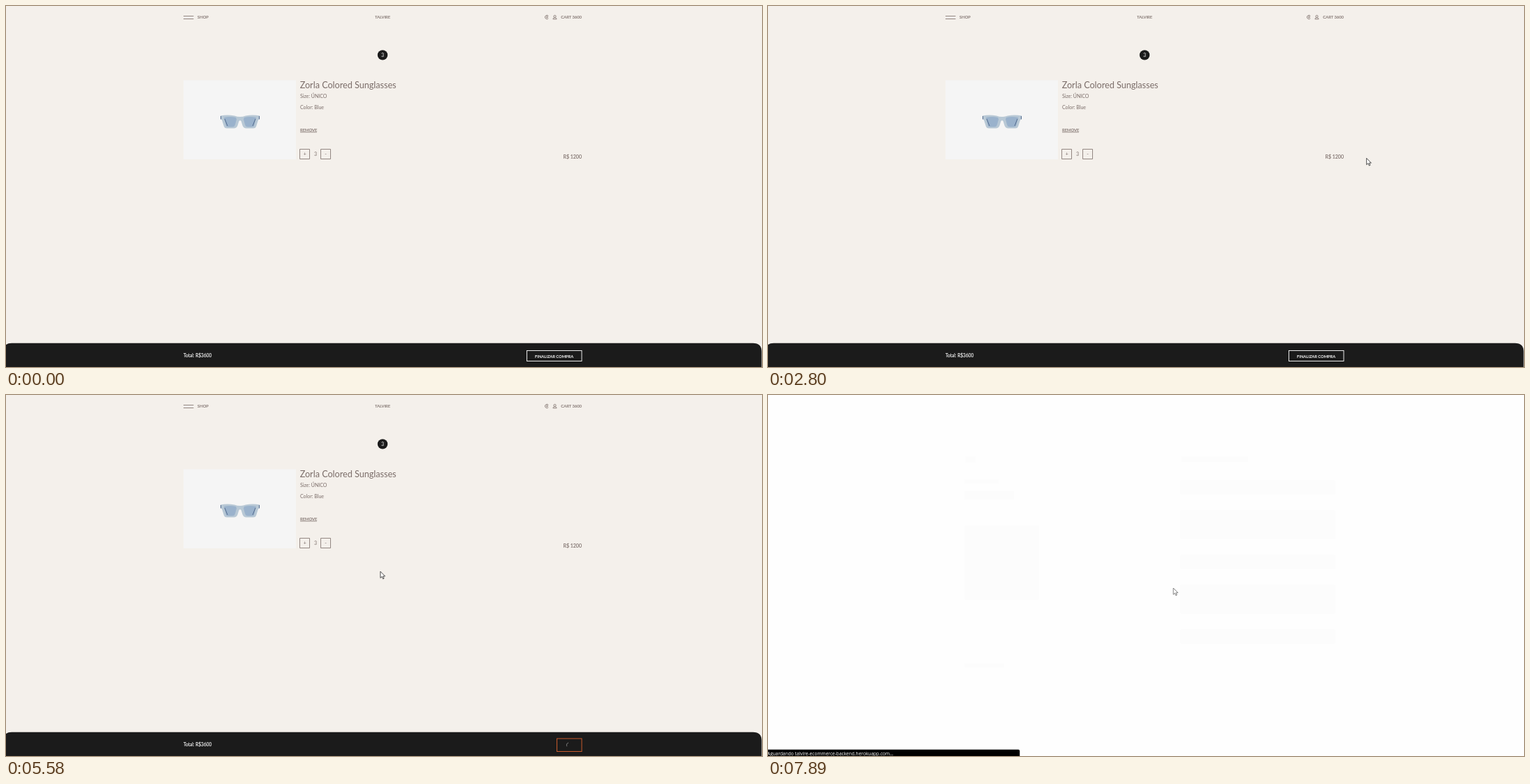
Write an HTML page that moves like this. It is 1082 by 518 pixels and loops after 8 s.

```html
<!DOCTYPE html>
<html lang="pt">
<head>
<meta charset="utf-8">
<title>Cart</title>
<style>
html, body { margin: 0; width: 100%; height: 100%; overflow: hidden; background: #f4f0eb; }
svg { display: block; width: 100vw; height: 100vh; }
text { font-family: Lato, sans-serif; fill: #7a6c68; }
.nav { font-size: 5.85px; }
.med { stroke: #7a6c68; stroke-width: .12px; }
.info { font-size: 7px; }
.line { fill: none; stroke: #7a6c68; stroke-width: .8px; }
.light { fill: #fff; }
.mid { text-anchor: middle; }
.end { text-anchor: end; }
#status text { font: 6.6px 'Open Sans', sans-serif; }
</style>
</head>
<body>
<svg viewBox="0 0 1082 518" preserveAspectRatio="none">
  <g id="cart">
    <rect width="1082" height="518" fill="#f4f0eb"/>
    <path class="line" d="M254 14.5h14.5M254 18.5h14.5"/>
    <text class="nav med" x="274" y="18.3">SHOP</text>
    <text class="nav med mid" x="539" y="18.3">TALVIRE</text>
    <g class="line">
      <path d="M776.2 14.2A2.7 2.7 0 1 0 776.2 17.8M773 15h3M773 16.6h2.6"/>
      <circle cx="785.5" cy="14.9" r="1.6"/>
      <path d="M782.9 18.8c0-2.8 5.2-2.8 5.2 0z"/>
    </g>
    <text class="nav med end" x="824" y="18.3">CART 3600</text>

    <circle cx="539" cy="70.4" r="7.2" fill="#1b1b1b"/>
    <text class="info light mid" x="539" y="73">3</text>

    <rect x="254" y="106.5" width="161" height="113.5" fill="#f5f5f5"/>
    <g transform="translate(335 156)">
      <g id="half">
        <path d="M.2 3Q-4 3-8 1.5-18-.3-28 1.5V6l2 1.500 3 9.500Q-22 19.500-19 19.500H-9Q-5 19.500-3.500 15.500L-1.700 9.500Q-1 8 .2 8z" fill="#b8c8d5"/>
        <path d="M-23 4Q-14 2-6 4L-5 6.500-7 14Q-8 17.500-11 17.500H-17Q-20 17.500-20.500 14.500z" fill="#9ab2cc"/>
        <path d="M-27.500 2V6.500M-22 6l4 10" fill="none" stroke="#526a8c"/>
      </g>
      <use href="#half" transform="scale(-1 1)"/>
    </g>

    <text x="420.7" y="117.5" font-size="12.6">Zorla Colored Sunglasses</text>
    <text class="info" x="421" y="132">Size: ÚNICO</text>
    <text class="info" x="421" y="148">Color: Blue</text>
    <text class="nav med" x="421" y="180">REMOVE</text>
    <path class="line" d="M421 181h24"/>
    <path class="line" d="M420.500 205.500h14v14h-14zM450.500 205.500h14v14h-14z"/>
    <text class="info mid" x="427.700" y="215">+</text>
    <text class="info mid" x="443" y="215">3</text>
    <text class="info mid" x="457.500" y="215">-</text>
    <text class="info med end" x="824" y="219.200">R$ 1200</text>

    <path d="M-4 518V496Q-4 483.700 8 483.700H1069Q1081.500 483.700 1081.500 496V518z" fill="#1b1b1b"/>
    <text class="light" x="254" y="504.400" font-size="6.550" stroke="#fff" stroke-width=".12">Total: R$3600</text>
    <g id="buy">
      <rect x="745.500" y="494.500" width="78.500" height="15" fill="none" stroke="#fff" stroke-width=".9"/>
      <text class="light mid" x="784.600" y="504.500" font-size="5.700" font-weight="700">FINALIZAR COMPRA</text>
    </g>
    <g id="busy">
      <rect x="788.500" y="493" width="35.500" height="18.500" fill="none" stroke="#c75a2c"/>
      <path id="spin" d="M0-4A4 4 0 0 1 4 0" fill="none" stroke="#8b8b8b" stroke-width=".8"/>
    </g>
  </g>

  <g id="blank">
    <rect width="1082" height="518" fill="#fefefe"/>
    <g id="left" fill="#fcfcfc">
      <rect x="283" y="88" width="14" height="9"/>
      <rect x="281" y="121" width="49" height="6"/>
      <rect x="281" y="138" width="71" height="12"/>
      <rect x="281" y="187" width="107" height="107" rx="2"/>
      <rect x="281" y="385" width="57" height="6"/>
    </g>
    <g id="right" fill="#fcfcfc">
      <rect x="592" y="88" width="95" height="8"/>
    </g>
  </g>

  <g id="status">
    <path d="M0 508.700H358q2.300 0 2.300 2V518H0z"/>
    <text class="light" x="-1" y="517.300">Aguardando talvire-ecommerce-backend.herokuapp.com...</text>
  </g>

  <g id="pointer" stroke="#222" stroke-width=".8" fill="#fff">
    <path id="arrow" d="M.5.500V9.800L2.700 7.800 4.200 11.200 5.700 10.500 4.300 7.300H7.200z"/>
    <path id="hand" d="M-1 1Q0-.500 1 1V5L5 6Q6 6.300 5.700 8L4.800 11V13H-1V11.500L-3.800 8Q-4 6.500-2.500 7L-1 8.200z"/>
  </g>
</svg>
<script>
const LOOP = 8000, STEP = 68.75, START = 190;
const $ = id => document.getElementById(id);
const ramp = (t, a, b) => Math.max(0, Math.min(1, (t - a) / (b - a)));
const ease = u => u * u * (3 - 2 * u);
const show = (id, on) => $(id).setAttribute('display', on ? 'inline' : 'none');
const move = (id, x, y, extra = '') => $(id).setAttribute('transform', `translate(${x} ${y})${extra}`);

// where the pointer goes next, and when it sets off and arrives
const moves = [
  { from: START, to: 900, x: 341, y: 146 },
  { from: 940, to: 1340, x: 548, y: 104 },
  { from: 1400, to: 1890, x: 414, y: 124 },
  { from: 1920, to: 2560, x: 869, y: 212 },
  { from: 2670, to: 3420, x: 241, y: 500 },
  { from: 3500, to: 3760, x: 305, y: 496.5 },
  { from: 3790, to: 4240, x: 792, y: 504 },
  { from: 4900, to: 5180, x: 479, y: 222 },
  { from: 5200, to: 5850, x: 579, y: 276.5 }
];

function pointerAt(t) {
  let x = 1012, y = 514;
  for (const m of moves) {
    const k = ease(ramp(t, m.from, m.to));
    x += (m.x - x) * k;
    y += (m.y - y) * k;
  }
  return [x, y];
}

// form placeholders, single and double rows by turns
for (let i = 0, y = 122; i < 5; i++) {
  const h = i % 2 ? 42 : 21;
  $('right').innerHTML += `<rect x="590" y="${y}" width="222" height="${h}" rx="2"/>`;
  y += h + 22;
}

function draw(now) {
  const time = now % LOOP;
  const t = START + Math.floor((time - START) / STEP) * STEP;
  const blank = time >= 6805;
  const busy = t >= 4520 && t < 6030;
  show('cart', !blank);
  show('blank', blank);
  show('buy', !busy);
  show('busy', busy);
  show('status', time >= 6180);
  move('spin', 806.5, 502.7, ` rotate(${(t - 4890) * .36 + 10})`);

  const settle = ramp(time, 6810, 7200);
  move('left', 8 * (1 - settle), 0);
  $('right').setAttribute('opacity', settle);

  const [x, y] = pointerAt(t);
  const hand = x > 745 && y > 493 && t > START + STEP * 4;
  show('pointer', time >= START);
  show('arrow', !hand);
  show('hand', hand);
  move('pointer', x + (blank ? .6 : 0), y);
  $('pointer').setAttribute('opacity', blank ? .7 : 1);
}

const begin = performance.now();
function tick() {
  draw(performance.now() - begin);
  requestAnimationFrame(tick);
}
tick();
</script>
</body>
</html>
```
